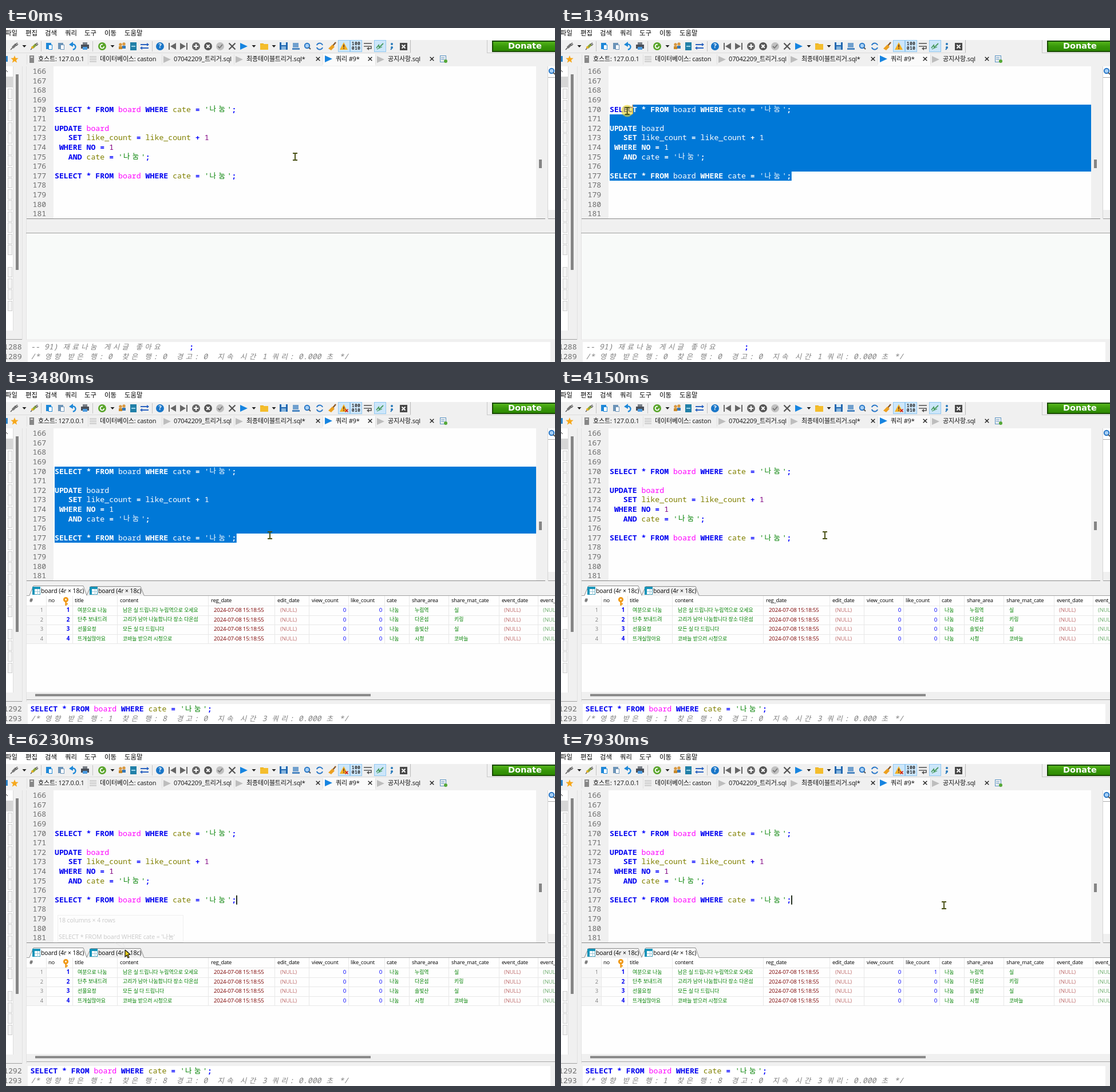
Recreate the animation shown at these times as an HTML page with a canvas. Size 959 by 584 pixels, loop 8000 ms.

```html
<!DOCTYPE html>
<html lang="ko">
<meta charset="utf-8">
<style>
html, body { margin: 0; width: 100%; height: 100%; overflow: hidden; background: #f0f0f0 }
canvas { display: block }
</style>
<canvas id="stage" width="959" height="584"></canvas>
<script>
const g = document.getElementById('stage').getContext('2d');
const UI = '"Open Sans", "Noto Sans CJK KR", "Noto Sans CJK", sans-serif';
const MONO = '"Noto Sans Mono", "Noto Sans CJK KR", "Noto Sans CJK", monospace';
const CW = 7.93, LH = 16.62, TOP = 67.9, LEFT = 85;
const BLUE = '#1e88d8', GRAY = '#666';

// event times in ms
const PRESS = 860, DRAGGED = 1540, RELEASE = 1740, RUN = 2810, RESULT = 2870, IDLE = 2940,
  CLICK = 3550, CLICK_END = 3690, HINT = 6170, TAB = 6450, TAB_END = 6580;
const BLINK = 540;

// drawing helpers
const rect = (x, y, w, h, c) => { g.fillStyle = c; g.fillRect(x, y, w, h); };
const frame = (x, y, w, h, c) => { g.strokeStyle = c; g.lineWidth = 1; g.strokeRect(x + .5, y + .5, w - 1, h - 1); };
const path = p => { g.beginPath(); for (let i = 0; i < p.length; i += 2) g.lineTo(p[i], p[i + 1]); };
const line = (c, w, ...p) => { path(p); g.strokeStyle = c; g.lineWidth = w; g.stroke(); };
const poly = (c, ...p) => { path(p); g.closePath(); g.fillStyle = c; g.fill(); };
const disc = (x, y, r, c) => { g.beginPath(); g.arc(x, y, r, 0, 7); g.fillStyle = c; g.fill(); };
const ring = (x, y, r, c, w = 2, a = 0, b = 6.3) => { g.beginPath(); g.arc(x, y, r, a, b); g.strokeStyle = c; g.lineWidth = w; g.stroke(); };
const cross = (x, y, r, c, w = 2) => { line(c, w, x - r, y - r, x + r, y + r); line(c, w, x + r, y - r, x - r, y + r); };
const within = (t, a, b) => t >= a && t < b;
function text(s, x, y, c = '#000', size = 11, spacing = -.1, align = 'left', weight = '') {
  g.font = `${weight} ${size}px ${UI}`;
  g.letterSpacing = spacing + 'px';
  g.textAlign = align;
  g.fillStyle = c;
  g.fillText(s, x, y);
}

// monospaced text: Korean glyphs take two cells
const cells = s => [...s].reduce((n, ch) => n + (ch > '\u1100' ? 2 : 1), 0);
function mono(s, x, y, c, style = '') {
  g.letterSpacing = '0px';
  g.textAlign = 'left';
  g.fillStyle = c;
  for (const ch of s) {
    const wide = ch > '\u1100';
    g.font = `${style} ${wide ? 12.4 : 13.2}px ${MONO}`;
    g.fillText(ch, x + (wide ? 1 : 0), y);
    x += wide ? 2 * CW : CW;
  }
}
const TOKEN = /'[^']*'|\w+|\s+|./g;
function sql(s, x, y, plain) {
  for (const tok of s.match(TOKEN) || []) {
    const key = /^[A-Z]+$/.test(tok);
    const c = key ? '#0000f0' : tok == 'board' ? '#f0f' : /^'/.test(tok) ? '#008000'
      : /^\d/.test(tok) ? '#800080' : /^\w/.test(tok) ? '#808000' : '#00f';
    mono(tok, x, y, plain || c, key || /^[=*+;]$/.test(tok) ? 'bold' : '');
    x += cells(tok) * CW;
  }
}

const QUERY = "SELECT * FROM board WHERE cate = '나눔';";
const code = Array(16).fill('');
code[4] = code[11] = QUERY;
code[6] = 'UPDATE board';
code[7] = '   SET like_count = like_count + 1';
code[8] = ' WHERE NO = 1';
code[9] = "   AND cate = '나눔';";
const rowMid = i => 76.3 + i * LH;

// pointer keys: time, x, y
const route = [[0, 505, 225], [190, 505, 225], [PRESS, 408, 259], [1060, 265, 211], [1340, 116, 145],
  [DRAGGED, 78, 136], [RELEASE, 78, 136], [2080, 461, 254], [4150, 461, 254], [4980, 385, 262],
  [5740, 218, 296], [5850, 211, 352], [6780, 211, 352], [7130, 669, 268], [8000, 669, 268]];

// smooth path through the keys that never overshoots them
const slope = (i, n) => (route[i + 1][n] - route[i][n]) / (route[i + 1][0] - route[i][0]);
function tangent(i, n) {
  if (i == 0 || i == route.length - 1) return 0;
  const a = slope(i - 1, n), b = slope(i, n);
  return a * b > 0 ? 2 * a * b / (a + b) : 0;
}
function pointer(t) {
  const i = Math.max(0, route.findIndex(k => k[0] > t) - 1), a = route[i], b = route[i + 1];
  const d = b[0] - a[0], k = Math.max(0, (t - a[0]) / d), s = k * k * (3 - 2 * k);
  return [1, 2].map(n => a[n] + (b[n] - a[n]) * s
    + d * k * (1 - k) * (tangent(i, n) * (1 - k) - tangent(i + 1, n) * k));
}

const caretDown = (x, y, c = '#222') => poly(c, x - 3.5, y - 2, x + 3.5, y - 2, x, y + 2);
const play = (x, y, c, r = 6) => poly(c, x - r, y - r, x + r + 1, y, x - r, y + r);
function magnifier(x, y) { disc(x, y, 4, '#a8d0f4'); ring(x, y, 4.2, '#2877c8', 2); line('#555', 2, x + 3, y + 3, x + 6, y + 6); }
function plug(x, c) {
  line('#555', 1.5, x - 6, 38, x - 2, 34);
  poly(c, x - 4, 33, x + 2, 27, x + 5, 30, x - 1, 36);
  line('#555', 1.5, x + 2, 29, x + 6, 26); line('#555', 1.5, x + 4, 31, x + 7, 28);
}
function sheet(x, c) { rect(x - 5, 26, 9, 11, c); rect(x - 1, 29, 7, 9, '#fff'); frame(x - 1, 29, 7, 9, c); }

function toolbar(busy, failed) {
  rect(0, 0, 959, 21, '#fff');
  [['파일', -1], ['편집', 34], ['검색', 68], ['쿼리', 103], ['도구', 137], ['이동', 172], ['도움말', 207]]
    .forEach(([s, x]) => text(s, x, 10.5, '#000', 11.4, 0));
  rect(706, 21, 1, 23, '#b8b8b8'); rect(0, 43, 707, 1, '#dcdcdc');
  rect(840, 21, 1, 23, '#c8c8c8'); rect(840, 43, 119, 1, '#c8c8c8');
  for (const x of [61, 151, 255]) rect(x, 23, 1, 18, '#c4c4c4');
  plug(14, '#777'); plug(49, '#8aa43c'); disc(46, 34, 2, '#e8b020');
  [32, 186, 468].forEach(x => caretDown(x, 32));
  caretDown(433, 32, busy ? '#999' : '#222');
  sheet(75, BLUE); sheet(96, '#6c94b8');
  ring(117, 33, 4.5, BLUE, 2.5, -1.7, 1.6); poly(BLUE, 110, 29, 117, 24, 117, 33);
  rect(131, 29, 14, 7, '#4a4f58'); rect(134, 25, 8, 4, '#7a8087'); rect(134, 33, 8, 5, '#4b9be0');
  disc(168, 32, 7, '#5aa52c'); ring(168, 32, 3.3, '#fff', 1.7, 0, 5);
  disc(200, 29, 2.7, '#d89840'); rect(197, 32, 6, 5, '#c98928'); disc(206, 28, 2.7, '#d89840'); rect(203, 31, 6, 5, '#3779b8');
  rect(217, 25, 11, 14, '#2180a8'); rect(219, 31, 7, 2, '#9cd4e8');
  for (const [y, d] of [[29, 1], [35, -1]]) { line('#2a62c0', 2, 235, y, 249, y); poly('#2a62c0', 242 + 4 * d, y - 3, 242 + 8 * d, y, 242 + 4 * d, y + 3); }
  disc(269, 32, 7, '#1976c8'); text('?', 269, 32, '#fff', 11, 0, 'center', 'bold');
  rect(284, 26, 2, 12, GRAY); poly(GRAY, 297, 26, 287, 32, 297, 38);
  rect(315, 26, 2, 12, GRAY); poly(GRAY, 304, 26, 314, 32, 304, 38);
  disc(332, 32, 7, GRAY); rect(328, 31, 8, 2, '#fff'); rect(331, 28, 2, 8, '#fff');
  disc(353, 32, 7, '#555'); cross(353, 32, 2.7, '#fff');
  disc(374, 32, 7, '#c0c0c0'); line('#777', 1.8, 370, 32, 373, 35, 378, 29);
  cross(395, 32, 5.5, '#555', 2.3);
  play(415, 32, busy ? '#777' : '#1684e0');
  rect(444, 27, 6, 3, '#e8a810'); rect(444, 28, 14, 10, '#f4bd2c');
  rect(478, 25, 14, 13, '#2268b0'); rect(481, 25, 8, 5, '#d8ebf8'); rect(481, 32, 8, 6, '#85b4dd');
  rect(501, 26, 10, 8, '#70a0ce'); rect(500, 35, 13, 3, '#4884c0');
  magnifier(526, 31);
  ring(548, 32, 5.5, '#2877c8', 2, .4, 2.8); ring(548, 32, 5.5, '#2877c8', 2, 3.5, 5.9);
  line('#8b5a2b', 2.5, 576, 25, 571, 31); poly('#eca020', 570, 29, 574, 33, 568, 39, 563, 36);
  for (const x of [580, 601, 643]) { rect(x, 21, 21, 21, '#cce6fa'); frame(x, 21, 21, 21, '#92c8f0'); }
  poly('#f4b020', 590, 25, 597, 38, 583, 38); rect(589.3, 29, 1.6, 5, '#533'); rect(589.3, 35, 1.6, 1.6, '#533');
  if (failed) cross(595, 36, 2.5, '#d02020', 1.7);
  g.font = `bold 8px ${MONO}`; g.textAlign = 'center'; g.letterSpacing = '.3px'; g.fillStyle = '#333';
  g.fillText('100', 611.5, 28); g.fillText('010', 611.5, 36);
  line('#555', 1.6, 625, 27, 639, 27); line('#555', 1.6, 625, 32, 638, 32, 638, 36, 632, 36); poly('#555', 634, 33, 630, 36, 634, 39);
  line('#4a9b60', 1.8, 647, 35, 651, 30, 652, 34, 659, 27); line('#4a9b60', 1.2, 648, 37, 657, 33);
  disc(674, 28, 2, '#2879ba'); disc(674, 34, 2, '#2879ba'); line('#2879ba', 2, 675, 34, 672, 38);
  rect(688, 26, 13, 13, busy ? '#e0301e' : '#484848'); cross(694.5, 32.5, 3, '#fff', 1.8);

  const green = g.createLinearGradient(0, 23, 0, 41);
  green.addColorStop(0, '#58b81c'); green.addColorStop(.5, '#38980a'); green.addColorStop(1, '#2c8800');
  rect(849, 22, 112, 20, '#174800'); rect(851, 24, 110, 16, green);
  g.font = 'bold 14.5px "DejaVu Sans", sans-serif'; g.letterSpacing = '0px'; g.textAlign = 'left'; g.fillStyle = '#fff';
  g.fillText('Donate', 877, 32.5);
}

function tabs() {
  rect(553, 45, 92, 21, '#fafafa');
  for (const x of [36, 143, 272, 398, 553, 645]) rect(x, 46, 1, 18, '#e0e0e0');
  rect(0, 49, 3, 10, '#2d84c8');
  const star = [];
  for (let i = 0; i < 10; i++) { const r = i % 2 ? 3 : 7, a = i * Math.PI / 5; star.push(15 + r * Math.sin(a), 55 - r * Math.cos(a)); }
  poly('#f6a81c', ...star);
  rect(41, 48, 8, 13, '#888'); rect(43, 50, 4, 2, '#ddd');
  for (const y of [49, 53, 57]) rect(146, y, 12, 3, '#d4d4d4');
  for (const x of [281, 407, 654]) play(x, 55, '#bdbdbd');
  play(563, 54, '#1684e0');
  [['호스트: 127.0.0.1', 56], ['데이터베이스: caston', 164], ['07042209_트리거.sql', 293],
    ['최종테이블트리거.sql*', 420], ['쿼리 #9*', 576], ['공지사항.sql', 667]].forEach(([s, x]) => text(s, x, 55, '#111', 11, -.15));
  for (const x of [545, 636, 744]) cross(x, 54, 3.3, '#222', 1.4);
  frame(758, 48, 11, 12, '#5a94c4'); line('#5a94c4', 1, 760, 52, 766, 52); line('#5a94c4', 1, 760, 55, 766, 55); disc(768, 58, 3, '#55a838');
}

function sidePanels() {
  rect(0, 67, 12, 462, '#fff');
  line('#333', 1, 0, 74, 3, 77);
  rect(0, 85, 12, 19, '#d6d6d6');
  for (let i = 0; i < 20; i++) if (i != 15) {
    const y = Math.round(106 + i * 19.5);
    rect(3, y, 8, 18, '#f4f4f4');
    frame(3, y, 8, 18, '#cfcfcf');
  }
  rect(12, 67, 1, 462, '#dedede');
  rect(17, 81, 5, 342, '#858585');
  rect(28, 67, 1, 478, '#e2e2e2'); rect(0, 544, 28, 1, '#a0a0a0');
  rect(947, 67, 12, 251, '#fff'); rect(946, 67, 1, 266, '#d4d4d4');
  rect(947, 86, 12, 1, '#aaa'); rect(947, 333, 12, 1, '#999');
  magnifier(953, 75);
}

// first selected row and column; the selection trails the pointer slightly
function selection(t) {
  if (!within(t, PRESS, CLICK)) return null;
  if (t >= DRAGGED) return [4, 0];
  const [x, y] = pointer(t - 20);
  const row = Math.min(11, Math.max(4, Math.floor((y - TOP) / LH)));
  return [row, Math.max(0, Math.min(cells(code[row]), Math.round((x - LEFT) / CW)))];
}

// the blink restarts after each action
function caretOn(t) {
  const start = t < DRAGGED ? t : t < RUN ? DRAGGED : t < IDLE ? t : t < CLICK ? IDLE : 3610;
  return Math.floor(Math.max(0, t - start) / BLINK) % 2 == 0;
}

function editor(t) {
  rect(36, 67, 47, 266, '#f0f0f0'); rect(83, 67, 843, 266, '#fefefe');
  rect(931, 230, 5, 15, '#858585'); rect(35, 333, 907, 1, '#8a8a8a'); rect(35, 67, 1, 478, '#e2e2e2');
  code.forEach((s, i) => { mono(String(166 + i), 46.5, rowMid(i), '#6c6c6c'); sql(s, LEFT, rowMid(i)); });
  const sel = selection(t);
  if (sel) {
    const [row, col] = sel;
    g.save();
    g.beginPath();
    for (let i = row; i < 12; i++) {
      const x = LEFT + (i == row ? col * CW : 0), y = Math.round(TOP + i * LH);
      g.rect(x, y, (i < 11 ? 926 : LEFT + 40 * CW + .6) - x, Math.round(TOP + (i + 1) * LH) - y);
    }
    g.clip();
    rect(83, 67, 843, 266, '#0078d7');
    code.forEach((s, i) => sql(s, LEFT, rowMid(i), '#fff'));
    g.restore();
    if (caretOn(t)) rect(LEFT + col * CW, TOP + row * LH, 1.3, 16, '#e89440');
  } else if (t >= CLICK && caretOn(t)) {
    rect(402, TOP + 11 * LH, 2, 16, '#243020');
  }
  if (within(t, RUN, RESULT)) {
    line('#dcdcdc', 1, 178.5, 68, 178.5, 137.5, 36, 137.5);
    line('#dcdcdc', 1.3, 214.5, 68, 214.5, 156, 36, 156);
  }
}

function log(done) {
  rect(0, 549, 38, 35, '#f0f0f0'); rect(38, 549, 913, 35, '#fff');
  const first = done ? 1292 : 1288;
  [0, 1].forEach(i => mono(String(first + i), -4, 558.5 + i * LH, '#6c6c6c'));
  if (done) sql(QUERY, 42.5, 558.5);
  else {
    mono('-- 91) 재료나눔 게시글 좋아요', 43, 558.5, '#808080', 'italic');
    mono(';', 320, 558.5, '#00f', 'bold');
  }
  const [hit, found, n] = done ? [1, 8, 3] : [0, 0, 1];
  mono(`/* 영향 받은 행: ${hit}  찾은 행: ${found}  경고: 0  지속 시간 ${n} 쿼리: 0.000 초 */`, 43, 575.2, '#808080', 'italic');
}

const columns = [['#', 41], ['no', 74], ['title', 120], ['content', 199], ['reg_date', 358], ['edit_date', 474], ['view_count', 534],
  ['like_count', 602], ['cate', 665], ['share_area', 709], ['share_mat_cate', 778], ['event_date', 866], ['event_time', 933]];
const posts = [
  ['여분으로 나눔', '남은 실 드립니다 누림역으로 오세요', '누림역', '실'],
  ['단추 보내드려', '고리가 남아 나눔합니다 장소 다온섬', '다온섬', '키링'],
  ['선물요정', '모든 실 다 드립니다', '솔빛산', '실'],
  ['뜨개실많아요', '코바늘 받으러 시청으로', '시청', '코바늘']];

function resultTab(x, active) {
  const y = active ? 342 : 343, s = active ? '#fff' : '#f0f0f0';
  poly(s, x, 360, x + 7, y, x + 94, y, x + 100, 360);
  line('#8c8c8c', 1, x, 359, x + 7, y + .5, x + 94, y + .5, x + 100, 359);
  rect(x + 5, 344, 14, 14, '#fff'); frame(x + 5, 344, 14, 14, '#3a9cb8');
  rect(x + 5, 344, 14, 4, '#1493b8'); rect(x + 5, 344, 4, 14, '#1493b8');
  line('#9cc8d8', 1, x + 9, 352.5, x + 19, 352.5); line('#9cc8d8', 1, x + 14.5, 348, x + 14.5, 358);
  text('board (4r × 18c)', x + 20, 352, '#000', 10.5);
}

function results(second) {
  rect(36, 359, 923, 1, '#a0a0a0');
  resultTab(41, !second); resultTab(141, second);
  rect(36, 360, 923, 168, '#fefefe');
  rect(36, 377, 34, 66, '#f6f6f6');
  for (const x of [70, 116, 194, 353, 469, 529, 598, 661, 704, 773, 861, 929]) rect(x, 360, 1, 83, '#e8e8e8');
  for (let i = 0; i < 5; i++) rect(36, Math.round(377 + i * 16.6), 923, 1, '#e8e8e8');
  for (const [s, x] of columns) text(s, x, 368.5, '#000', 9.4, -.2);
  ring(104.5, 366.5, 3, '#f09a18', 3.2); rect(103.3, 369, 2.6, 8, '#f09a18'); rect(105, 373, 3, 2, '#f09a18');
  posts.forEach(([title, body, area, kind], i) => {
    const y = 385.5 + i * 16.65, cell = (s, x, c, size = 9.7, ...more) => text(s, x, y, c, size, -.2, ...more);
    cell(i + 1, 65, '#808080', 9.4, 'right');
    cell(i + 1, 111, '#0000f0', 9.7, 'right', 'bold');
    for (const [s, x] of [[title, 125], [body, 204], ['나눔', 670], [area, 714], [kind, 783]]) text(s, x, y, '#008000', 8.9, 0);
    cell('2024-07-08 15:18:55', 363, '#7c0000');
    cell('(NULL)', 479, '#c07070'); cell('(NULL)', 870, '#c07070'); cell('(NULL)', 938, '#72b072');
    cell('0', 594, '#00f', 9.7, 'right');
    cell(second && i == 0 ? '1' : '0', 657, '#00f', 9.7, 'right');
  });
  rect(36, 528, 923, 14, '#f0f0f0'); rect(51, 531.5, 586, 4, '#858585'); rect(36, 541, 923, 1, '#a8a8a8');
}

function tooltip(t) {
  if (!within(t, HINT, TAB)) return;
  g.globalAlpha = Math.min(1, (t - HINT) / 200);
  rect(90, 285, 220, 48, '#f8f8f8'); frame(90, 285, 220, 48, '#d0d0d0');
  line('#d0d0d0', 1, 190, 333, 208, 344, 204, 333);
  text('18 columns × 4 rows', 92, 295.5, '#555', 10.6);
  text("SELECT * FROM board WHERE cate = '나눔'", 92, 324, '#555', 10.6);
  g.globalAlpha = 1;
}

function cursor(t) {
  const [x, y] = pointer(t);
  const pressed = within(t, PRESS, RELEASE) || within(t, CLICK, CLICK_END) || within(t, TAB, TAB_END);
  if (pressed) disc(x, y, 10.5, 'rgba(232,212,40,.62)');
  if (y > 336) {
    const p = [[0, 0], [0, 12], [3, 9.5], [5, 14], [7, 13], [5, 8.5], [9, 8]].flatMap(([u, v]) => [x - 3 + u, y - 6 + v]);
    poly('#e8d020', ...p);
    line('#111', 1.2, ...p, p[0], p[1]);
  } else {
    const c = '#4b5218';
    line(c, 2, x, y - 6, x, y + 6);
    for (const d of [-6, 6]) line(c, 2, x - 4, y + d, x + 4, y + d);
  }
}

function draw(t) {
  const done = t >= RESULT;
  g.textBaseline = 'middle';
  rect(0, 0, 959, 584, '#f0f0f0');
  toolbar(within(t, RUN, IDLE), t >= RUN);
  tabs();
  sidePanels();
  editor(t);
  if (done) results(t >= TAB);
  else { rect(35, 358, 924, 1, '#a0a0a0'); rect(36, 359, 923, 185, '#f8faf9'); }
  log(done);
  tooltip(t);
  cursor(t);
}
function tick() {
  draw(performance.now() % 8000);
  requestAnimationFrame(tick);
}
tick();
</script>
</html>
```
